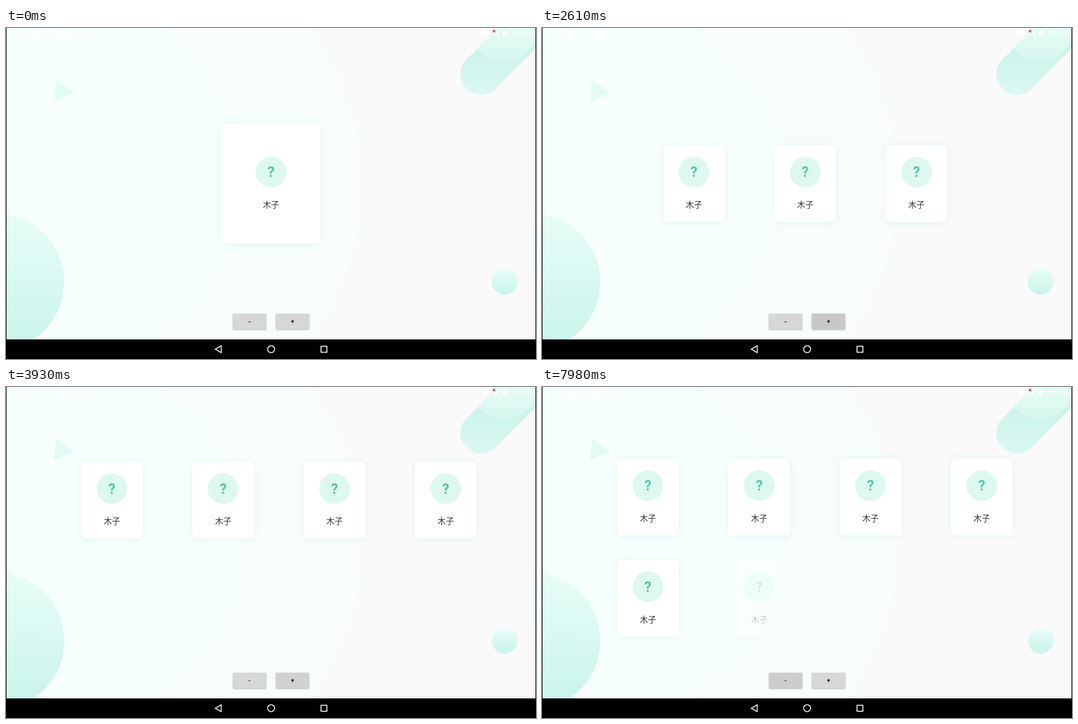
Write an HTML page that moves like this. It is 947x591 px and loops after 8000 ms.

```html
<!DOCTYPE html>
<html lang="zh">
<head>
<meta charset="utf-8">
<title>Card grid</title>
<style>
  html, body { margin: 0; width: 100%; height: 100%; overflow: hidden; background: #000; }
  svg { display: block; width: 100%; height: 100%; }
  text { text-anchor: middle; }
  .panel { fill: #fff; filter: drop-shadow(0 1px 6px rgba(190, 236, 224, .45)); }
  .disc { fill: #ddf8ef; }
  .mark { font: bold 25px Roboto, sans-serif; fill: #55c8a5; }
  .name { font: 14.6px "Noto Sans CJK SC", "Noto Sans CJK", sans-serif; fill: #333; }
  .sign { font: bold 11px Roboto, sans-serif; fill: #111; }
  .clock { font: 9.5px Roboto, "Noto Sans CJK SC", sans-serif; fill: #fff; }
  .nav { fill: none; stroke: #fff; stroke-width: 1.6; }
  .arc { stroke: #f2f9f7; stroke-width: 1; }
</style>
</head>
<body>
<svg viewBox="0 0 947 591" preserveAspectRatio="none">
  <defs>
    <linearGradient id="mint" x2="0" y2="1">
      <stop stop-color="#e8fdf8"/><stop offset="1" stop-color="#c8f4ea"/>
    </linearGradient>
    <linearGradient id="pillFill" gradientUnits="userSpaceOnUse" x1="0" x2="0" y1="40" y2="122">
      <stop stop-color="#cdf3ea"/><stop offset="1" stop-color="#dbf9f2"/>
    </linearGradient>
    <linearGradient id="glow" gradientUnits="userSpaceOnUse" x1="0" x2="0" y1="0" y2="57">
      <stop stop-color="#e6fcf6"/><stop offset="1" stop-color="#d7f7ef"/>
    </linearGradient>
    <clipPath id="page"><rect x="1" width="945" height="556"/></clipPath>
    <clipPath id="pill"><path id="pillShape" d="M820 59 L920 -41 L1024 -41 L872 111 A37 37 0 0 1 820 59Z"/></clipPath>
    <clipPath id="face"><rect width="59.5" height="28" rx="2"/></clipPath>
  </defs>

  <g clip-path="url(#page)">
    <rect width="947" height="556" fill="#fafafa"/>
    <circle class="arc" cx="154" cy="278" r="483" fill="#f8fdfc"/>
    <circle class="arc" cx="115" cy="275" r="319" fill="#f6fffd"/>
    <path d="M89 93 L122 115 L86 132Z" fill="#e2fbf5"/>
    <circle cx="-18.6" cy="453.5" r="122.6" fill="url(#mint)"/>
    <circle cx="891" cy="453" r="23" fill="url(#mint)"/>
    <use href="#pillShape" fill="url(#pillFill)"/>
    <circle cx="890" cy="-8" r="65" fill="url(#glow)" clip-path="url(#pill)"/>

    <g fill="#fff">
      <circle cx="35" cy="9" r="5"/>
      <rect x="48" y="4" width="13" height="10" rx="2"/>
      <path d="M74 4 L79 14 H69Z"/>
      <rect x="88" y="3" width="12" height="12" rx="2"/>
      <circle cx="114" cy="9" r="5"/>
      <path d="M134 4 L139 14 H129Z"/>
      <path d="M848 6 Q854 1 860 6 L854 14Z"/>
      <path d="M873 13 L881 5 V13Z"/>
      <path d="M888 5 H890 V3.500 H893 V5 H895 V14 H888Z"/>
    </g>
    <text class="clock" x="921" y="12.500">上午10:28</text>
    <path d="M870 3.500 L874 7.500 M874 3.500 L870 7.500" stroke="#c62020" stroke-width="1.200"/>

    <g id="cards"></g>
    <g id="buttons"></g>
  </g>

  <path class="nav" d="M384.500 567.500 V579.500 L374 573.500Z"/>
  <circle class="nav" cx="473.700" cy="573.500" r="6.200"/>
  <rect class="nav" x="562.800" y="568.300" width="10.600" height="10.600"/>
</svg>

<script>
const LOOP = 8000, PHASE = 300, PRESS = 170;
const FIRST_COUNT = 1, MAX_CARDS = 7;
// Each click: time in ms, number of cards afterwards
const clicks = [[290, 2], [1404, 3], [2540, 4], [3680, 5], [4840, 6], [5920, 7], [6940, 6], [7780, 5]]
  .map(([time, to], i, all) => ({ time, to, from: i ? all[i - 1][1] : FIRST_COUNT }));

const clamp = x => Math.min(1, Math.max(0, x));
const ease = x => (1 - Math.cos(Math.PI * clamp(x))) / 2;
const mix = (a, b, p) => a + (b - a) * p;

function build(parent, html) {
  const g = document.createElementNS('http://www.w3.org/2000/svg', 'g');
  g.innerHTML = html;
  return document.getElementById(parent).appendChild(g);
}

function setAttrs(el, attrs) {
  for (const key in attrs) el.setAttribute(key, attrs[key]);
}

const cards = Array.from({ length: MAX_CARDS }, () => build('cards',
  `<rect class="panel" rx="8"/><circle class="disc" cy="-20.3" r="27.3"/>
   <text class="mark" y="-11.300">?</text><text class="name" y="43.500">木子</text>`));

function makeButton(x, sign, touchX) {
  const g = build('buttons',
    `<rect class="base" width="59.5" height="28" rx="2" fill="#d7d7d7"/>
     <g clip-path="url(#face)"><rect class="tint" width="59.5" height="28"/>
     <circle class="ripple" cx="${touchX}" cy="16" r="0"/></g>
     <text class="sign" x="29.700" y="17.600">${sign}</text>`);
  g.setAttribute('transform', `translate(${x} 510)`);
  const [base, tint, ripple] = ['.base', '.tint', '.ripple'].map(s => g.querySelector(s));
  return { base, tint, ripple };
}
const minus = makeButton(405.5, '-', 14);
const plus = makeButton(482.2, '+', 30);

// Centre and width of one card in a grid of `count` cards, four per row
function place(count, i) {
  const cols = Math.min(count, 4);
  const w = count < 3 ? 177.2 : 110.6;
  const middle = [473.5, 479.2, 482.8, 487.5][cols - 1];
  return {
    x: middle + (i % 4 - (cols - 1) / 2) * (w + 88.2),
    y: count > 4 ? 196.6 + 180.5 * Math.floor(i / 4) : 277.7,
    w
  };
}

function drawCard(card, i, { from, to }, dt) {
  let opacity = 1;
  if (i >= from) opacity = i < to ? ease((dt - PHASE) / PHASE) : 0;
  else if (i >= to) opacity = 1 - ease(dt / PHASE);

  const end = place(i < to ? to : from, i);
  const start = i < from ? place(from, i) : end;
  const p = ease(dt / PHASE);
  const w = mix(start.w, end.w, p), h = w * 1.157 + 9;
  setAttrs(card, { opacity, transform: `translate(${mix(start.x, end.x, p)} ${mix(start.y, end.y, p)})` });
  setAttrs(card.firstChild, { x: -w / 2, y: -h / 2, width: w, height: h });
}

function drawButton(button, press, t) {
  let held = 0, level = 0;
  if (press) {
    held = t - press.time + PRESS;
    level = clamp(held / 80) * clamp(1 - (t - press.time - 60) / 340);
  }
  button.base.style.filter =
    `drop-shadow(0 ${1 + level}px ${1 + level * .5}px rgba(0, 0, 0, .3))`;
  button.tint.setAttribute('opacity', .037 * level);
  setAttrs(button.ripple, { r: 33 * (held / 160) ** 2, opacity: .037 * level });
}

function draw(t) {
  const idle = { time: 0, from: FIRST_COUNT, to: FIRST_COUNT };
  const current = clicks.filter(c => c.time <= t).pop() || idle;
  cards.forEach((card, i) => drawCard(card, i, current, t - current.time));

  const press = clicks.find(c => t > c.time - PRESS && t < c.time + 400);
  const adding = press && press.to > press.from;
  drawButton(plus, adding ? press : null, t);
  drawButton(minus, press && !adding ? press : null, t);
}

function frame() {
  draw(performance.now() % LOOP);
  requestAnimationFrame(frame);
}
frame();
</script>
</body>
</html>
```
